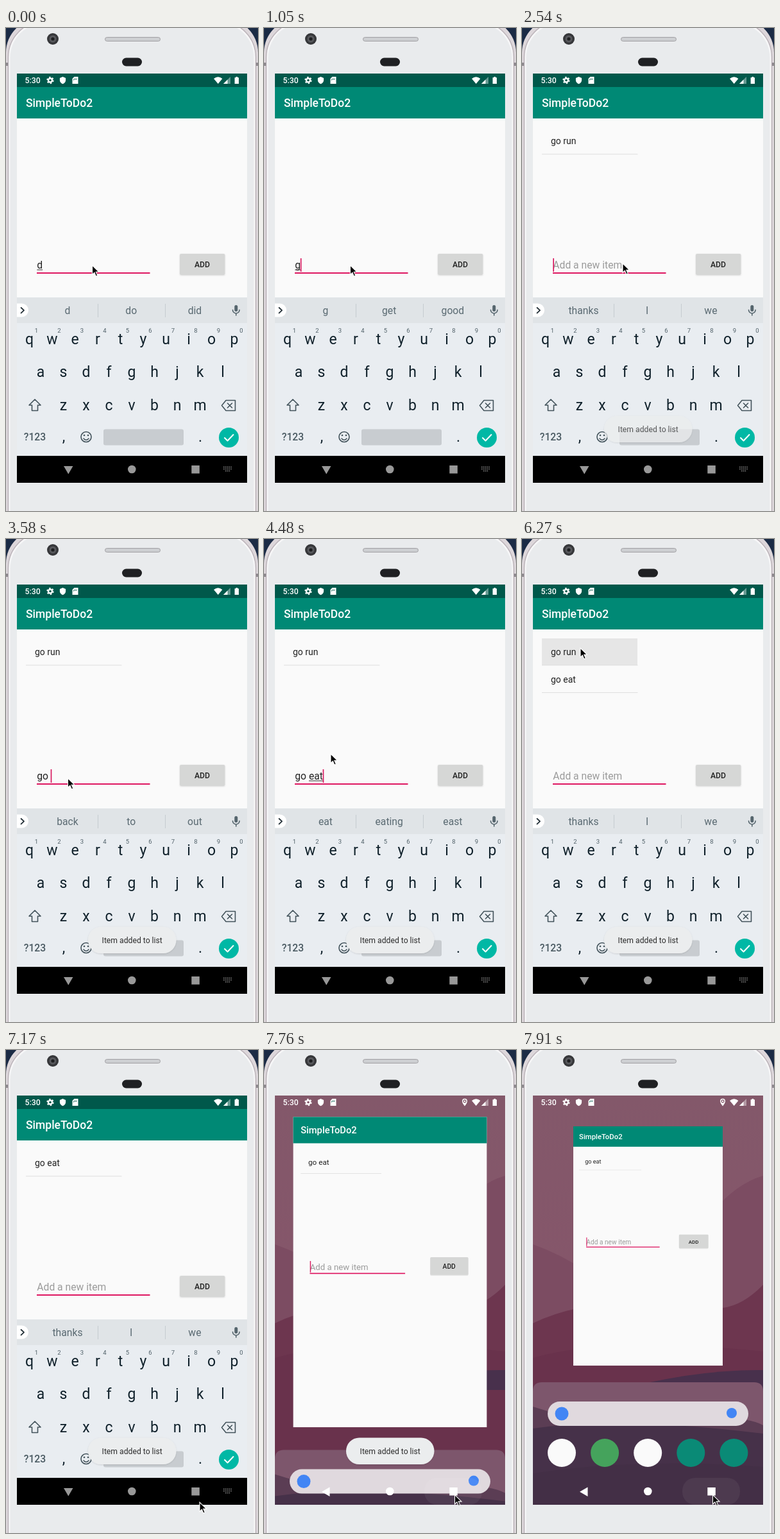
An HTML page for the animation above (8 s loop, 393 by 753 pixels).

```html
<!DOCTYPE html>
<html lang="en">
<head>
<meta charset="utf-8">
<title>To-do list demo</title>
<style>
  html, body { margin: 0; width: 100%; height: 100%; overflow: hidden; background: #1b2b45; }
  svg { display: block; width: 393px; height: 753px; }
  text { font-family: Roboto, Arial, sans-serif; white-space: pre; }
  .mid { text-anchor: middle; }
  .med { font-weight: 500; }
  .line { fill: none; stroke-linecap: round; stroke-linejoin: round; }
</style>
</head>
<body>
<svg viewBox="0 0 393 753" xmlns="http://www.w3.org/2000/svg">
  <defs>
    <clipPath id="screenClip"><rect x="17" y="71" width="359" height="638"/></clipPath>
    <clipPath id="appClip"><rect x="17" y="92" width="359" height="575"/></clipPath>
    <clipPath id="keysClip"><rect x="17" y="420" width="359" height="247"/></clipPath>
    <clipPath id="btnClip"><rect x="271" y="352" width="70.500" height="33" rx="2"/></clipPath>
    <linearGradient id="wall" x1="0" y1="0" x2="0" y2="1">
      <stop offset="0" stop-color="#83586a"/>
      <stop offset=".4" stop-color="#85566a"/>
      <stop offset="1" stop-color="#7a4a61"/>
    </linearGradient>
    <filter id="soft" x="-20%" y="-40%" width="140%" height="190%">
      <feDropShadow dx="0" dy=".8" stdDeviation=".8" flood-opacity=".14"/>
    </filter>
  </defs>

  <!-- phone body -->
  <rect width="393" height="753" fill="#1b2b45"/>
  <rect x="0" y="-14" width="393" height="900" rx="52" fill="#ddd7db"/>
  <rect x="3.500" y="-10.500" width="386" height="900" rx="56" fill="#f6f6f7" stroke="#b9b1b7" stroke-width="1.400"/>
  <rect x="6.500" y="-7.500" width="380" height="900" rx="54" fill="#e9ebed"/>
  <path d="M0 54h3v5H0zM390 54h3v5h-3z" fill="#8d888d"/>
  <circle cx="73" cy="17" r="9" fill="#36373a"/>
  <circle cx="73" cy="17" r="5.500" fill="#58595d"/>
  <circle cx="73" cy="17" r="2.600" fill="#1d1e20"/>
  <rect x="154.500" y="14.500" width="86" height="6" rx="3" fill="#cdcfd2" stroke="#a09fa3"/>
  <rect x="181" y="46.500" width="31" height="13" rx="6.500" fill="#1f2023"/>

  <g clip-path="url(#screenClip)">
    <g id="home">
      <rect x="17" y="71" width="359" height="638" fill="url(#wall)"/>
      <path d="M17 303Q60 318 100 345T250 320Q310 215 376 196V709H17z" fill="#7c4c62"/>
      <path d="M17 426Q50 410 90 402H313Q345 398 376 366V709H17z" fill="#6d364f"/>
      <path d="M17 480Q140 445 376 470V709H17z" fill="#69324c"/>
      <path d="M190 520Q290 498 376 499V530H190z" fill="#48304c"/>
      <g id="dock">
        <path d="M17 709V532q0-14 14-14H362q14 0 14 14V709z" fill="#7d566c"/>
        <path d="M17 556Q120 590 230 578T376 585V709H17z" fill="#5b3d54"/>
        <path d="M17 590Q150 570 376 598V709H17z" fill="#463149"/>
        <path d="M17 660Q180 635 376 650V709H17z" fill="#432f46"/>
        <rect x="40" y="548" width="313" height="38" rx="19" fill="#e0d9de"/>
        <circle cx="62" cy="567" r="10.500" fill="#4285f4"/>
        <circle cx="327" cy="566" r="8" fill="#4285f4"/>
        <g id="icons"></g>
      </g>
    </g>

    <g id="app" clip-path="url(#appClip)">
      <rect x="17" y="92" width="359" height="575" fill="#fafafa"/>
      <rect x="17" y="92" width="359" height="49" fill="#008975"/>
      <text class="med" x="31" y="123" font-size="17.500" fill="#fff">SimpleToDo2</text>
      <rect id="press" x="31" y="155" width="149" height="42" fill="#000"/>
      <g id="list"></g>
      <text id="entry" x="48.300" y="375.300" font-size="15.700"></text>
      <rect id="compose" y="376.500" height="1" fill="#333"/>
      <rect id="caret" y="359" width="1.700" height="21" fill="#d81b60"/>
      <rect x="48" y="381" width="176.500" height="2" fill="#de1660"/>
      <g filter="url(#soft)"><rect id="btn" x="271" y="352" width="70.500" height="33" rx="2"/></g>
      <circle id="ripple" cx="318" cy="368" r="42" fill="#babbba" clip-path="url(#btnClip)"/>
      <text class="mid med" x="306" y="373.300" font-size="12.200" fill="#222">ADD</text>
    </g>

    <g clip-path="url(#keysClip)">
      <g id="keys">
        <rect x="17" y="420" width="359" height="40" fill="#e0e4e7"/>
        <rect x="17" y="460" width="359" height="207" fill="#e9edf1"/>
        <path d="M17 429.500h7.500a10.500 10.500 0 0 1 0 21H17z" fill="#fff"/>
        <path class="line" d="M23.500 436l4.500 4.200-4.500 4.200" stroke="#222f36" stroke-width="1.800"/>
        <path d="M143.500 430v21M248.500 430v21" stroke="#c6ccd0"/>
        <g id="words" font-size="15.700" fill="#5a6a72"></g>
        <rect x="356.300" y="432" width="5" height="10" rx="2.500" fill="#55656d"/>
        <path class="line" d="M353.500 439.500a5.300 5.300 0 0 0 10.600 0M358.800 445v3" stroke="#55656d" stroke-width="1.600"/>
        <g id="letters" font-size="23" fill="#10212b"></g>
        <g class="line" stroke="#43535b" stroke-width="1.600">
          <path d="M45 579l9 9h-4.500v8.500h-9V588H36z"/>
          <path d="M343 580.500h14.500v16H343l-6.500-8zM345.500 585l7 7m0-7l-7 7"/>
          <circle cx="125" cy="637.500" r="8"/>
          <path d="M121 640q4 4.500 8 0"/>
        </g>
        <circle cx="122" cy="635" r="1.300" fill="#43535b"/>
        <circle cx="128" cy="635" r="1.300" fill="#43535b"/>
        <text class="mid med" x="45" y="643.300" font-size="15.700" fill="#4a5a62">?123</text>
        <rect x="152" y="625.500" width="125" height="25" rx="3" fill="#c8ccd0"/>
        <circle cx="347.500" cy="638.500" r="15.500" fill="#00b8a5"/>
        <path class="line" d="M341 639l4.500 4.500 9-9.500" stroke="#fff" stroke-width="2"/>
      </g>
    </g>

    <rect id="statusBg" x="17" y="71" width="359" height="21" fill="#00584b"/>
    <g fill="#fff">
      <text class="med" x="29.500" y="86.300" font-size="12.300">5:30</text>
      <circle cx="69" cy="81.500" r="3" fill="none" stroke="#fff" stroke-width="2.400"/>
      <circle cx="69" cy="81.500" r="4.800" fill="none" stroke="#fff" stroke-width="1.700" stroke-dasharray="2.500 2.530"/>
      <path d="M88.500 76l4.600 2v3.300q0 4-4.600 6-4.600-2-4.600-6V78z"/>
      <path d="M106.500 76h6v11h-9v-8z"/>
      <path d="M105.500 79.500v2M107.500 78.500v2.500M109.700 78.500v2.500" stroke="#00584b" stroke-width=".9"/>
      <path d="M324 79q6.700-5.500 13.400 0l-6.700 8z"/>
      <path d="M350 76v11h-11z" opacity=".4"/>
      <path d="M345.500 80.500V87H339z"/>
      <path d="M358.500 76h2.600v1.200h1.900V87h-6.400v-9.800h1.900z"/>
      <path id="pin" fill-rule="evenodd" d="M313 87.500q-4-4.800-4-7.700a4 4 0 0 1 8 0q0 2.900-4 7.700zM313 77.200a2.600 2.600 0 1 0 .01 0zM313 78.500a1.300 1.300 0 1 1-.01 0z"/>
    </g>

    <rect id="navBg" x="17" y="667" width="359" height="42" fill="#000"/>
    <rect id="navPress" x="250" y="667" width="90" height="42" rx="20" fill="#fff"/>
    <g id="nav">
      <path id="back" d="M90 683h14.500l-7.250 12.500z"/>
      <circle cx="196.300" cy="688" r="6.300"/>
      <rect x="289.300" y="682" width="12.500" height="12.500"/>
    </g>
    <path id="switcher" d="M339 684.500h14M339 687.500h14M342 690.500h8" stroke="#8a8a8a" stroke-width="1.600" stroke-dasharray="1.600 1.200"/>

    <g id="toast">
      <rect x="128" y="604.500" width="137.500" height="41.500" rx="20.500" fill="#ebedee" filter="url(#soft)"/>
      <text class="mid" x="196.700" y="629.700" font-size="12.200" fill="#2c2c2c">Item added to list</text>
    </g>
  </g>

  <path id="mouse" d="M0 0V14.500l3.400-3.200 2.400 5.600 2.400-1-2.400-5.500h4.700z" fill="#000" stroke="#fff" stroke-width="1.100"/>
</svg>

<script>
const LOOP = 8000;
const LEFT = 48.3;
const $ = id => document.getElementById(id);
const set = (id, name, value) => $(id).setAttribute(name, value);
const show = (id, alpha) => set(id, 'opacity', Number(alpha));
const pen = document.createElement('canvas').getContext('2d');
const widthOf = s => {
  pen.font = '15.7px Roboto, Arial, sans-serif';
  return pen.measureText(s).width;
};

// Each track holds its latest entry until the next one: [time, ...values].
const typing = [
  [0, 'd', 'd do did'], [750, '', 'thanks I we'],
  [1050, 'g', 'g get good'], [1200, 'go', 'go good going'],
  [1350, 'go ', 'back to out'], [1500, 'go r', 'r run right'],
  [1800, 'go ru', 'ru run running'], [1950, 'go run', 'run running runs'],
  [2400, '', 'thanks I we'],
  [3290, 'g', 'g get good'], [3440, 'go', 'go good going'],
  [3580, 'go ', 'back to out'], [3880, 'go e', 'e eat either'],
  [4030, 'go ea', 'ea eat each'], [4330, 'go eat', 'eat eating east'],
  [5520, '', 'thanks I we']
];
const mouse = [
  [0, 134.5, 370], [1950, 215, 368], [2100, 305, 367], [2250, 316, 366],
  [2540, 157, 367], [2690, 122, 369], [2840, 107, 372], [2990, 96.5, 373],
  [4480, 104, 335], [4630, 130, 292], [4780, 195, 302], [4930, 262, 336],
  [5080, 305, 360], [5230, 316.5, 366],
  [5670, 225, 290], [5820, 120, 205], [5970, 91, 170],
  [6720, 145, 350], [6870, 230, 545], [7020, 288, 676],
  [7170, 302, 705], [7320, 297.5, 693.5]
];
const items = [[0, ''], [2400, 'go run'], [5520, 'go run,go eat'], [6570, 'go eat']];
const caret = [[0, 0], [450, 1], [5970, 0], [6420, 1], [7020, 0], [7470, 1]];
const toast = [[0, 0], [2540, .75], [2690, 1], [4630, .4], [4780, 0],
  [5670, .75], [5820, 1], [7770, .4], [7910, 0]];
const button = [[0, 0], [2250, 1], [2400, 2], [2540, 0], [5380, 1], [5520, 2], [5670, 0]];
const rowPress = [[0, 0], [6270, .08], [6420, .16], [6570, 0]];
const keysDrop = [[0, 0], [7470, 110], [7620, 250]];
const overview = [[0, 0], [7620, .45], [7770, .85], [7910, 1]];

const at = (track, t) => track.findLast(entry => entry[0] <= t).slice(1);

function letterRow(row, x, y) {
  return [...row].map((c, i) =>
    `<text class="mid" x="${x + i * 35.5}" y="${y}">${c}</text>`).join('');
}

function build() {
  $('letters').innerHTML = letterRow('qwertyuiop', 36.5, 492.5) +
    letterRow('asdfghjkl', 54, 544) + letterRow('zxcvbnm', 89.5, 595.5) +
    '<text class="mid" x="90" y="645">,</text><text class="mid" x="303" y="645">.</text>' +
    [...'1234567890'].map((c, i) =>
      `<text class="mid" x="${47.3 + i * 35.5}" y="475" font-size="9.5" fill="#4f5f67">${c}</text>`).join('');
  $('icons').innerHTML = ['#fafafa', '#45a35c', '#fafafa', '#0a8a76', '#0a8a76'].map((c, i) =>
    `<circle cx="${62 + i * 67.1}" cy="628" r="22" fill="${c}"/>`).join('');
}

function drawEntry(t) {
  const [text, words] = at(typing, t);
  const start = text.lastIndexOf(' ') + 1;
  $('entry').textContent = text || 'Add a new item';
  set('entry', 'fill', text ? '#222' : '#9b9b9b');
  set('compose', 'x', LEFT + widthOf(text.slice(0, start)));
  set('compose', 'width', widthOf(text.slice(start)));
  set('caret', 'x', LEFT + widthOf(text) - (text ? .3 : 0));
  show('caret', at(caret, t)[0]);
  $('words').innerHTML = words.split(' ').map((w, i) =>
    `<text class="mid" x="${96 + i * 99.2}" y="446">${w}</text>`).join('');
}

function drawList(t) {
  const names = at(items, t)[0].split(',').filter(Boolean);
  $('list').innerHTML = names.map((name, i) => {
    const y = i * 42.6;
    return `<text x="45" y="${181 + y}" font-size="14" fill="#222">${name}</text>` +
      `<rect x="31" y="${196.3 + y}" width="149.5" height="1" fill="#dedede"/>`;
  }).join('');
  show('press', at(rowPress, t)[0]);
}

function drawOverview(t) {
  const p = at(overview, t)[0];
  const home = p > 0;
  const scale = 1 - .351 * p;
  set('app', 'transform',
    `translate(${17 + 63 * p} ${92 + 27 * p}) scale(${scale}) translate(-17 -92)`);
  set('dock', 'transform', `translate(0 ${(1 - p) * 192})`);
  const drop = at(keysDrop, t)[0];
  set('keys', 'transform', `translate(0 ${drop})`);
  show('statusBg', !home);
  show('navBg', !home);
  show('pin', home);
  show('navPress', t < 7320 ? 0 : home ? .05 : .14);
  set('nav', 'fill', home ? '#fff' : '#989898');
  set('back', 'transform', drop ? 'rotate(90 97 688.5)' : '');
  show('switcher', !drop);
}

function draw(t) {
  drawEntry(t);
  drawList(t);
  drawOverview(t);
  const level = at(button, t)[0];
  set('btn', 'fill', ['#d6d7d6', '#c9cac9', '#c2c3c2'][level]);
  show('ripple', level === 1);
  show('toast', at(toast, t)[0]);
  set('mouse', 'transform', `translate(${at(mouse, t).join(' ')})`);
}

build();
const began = performance.now();
function tick() {
  draw((performance.now() - began) % LOOP);
  requestAnimationFrame(tick);
}
tick();
</script>
</body>
</html>
```
